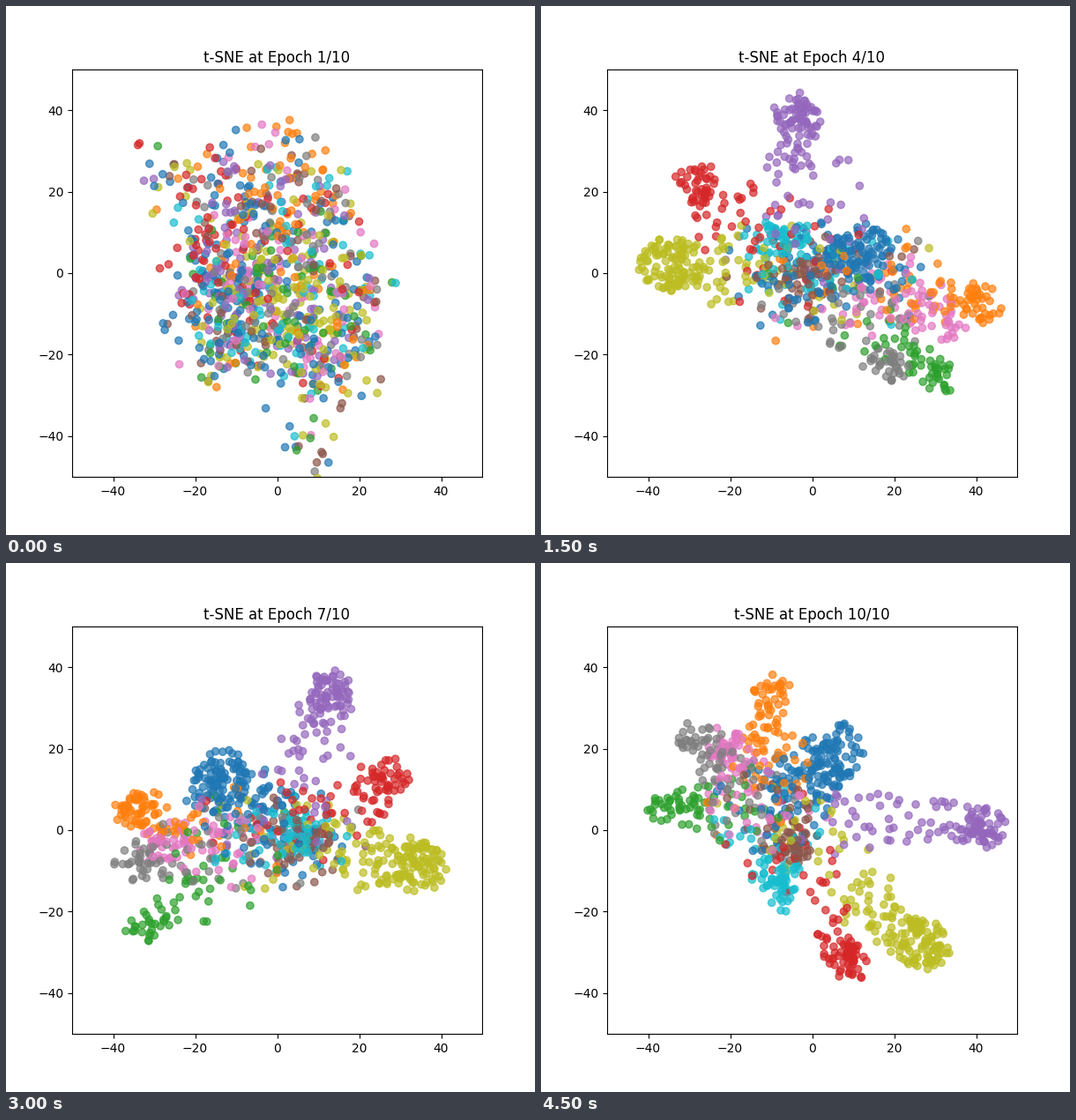
A matplotlib script that plays this animation: 600 by 600 pixels, repeating every 5000 ms.

```python
import numpy as np
import matplotlib.pyplot as plt
from matplotlib.animation import FuncAnimation

STEP_MS = 500
# Classes in tab10 order: size, and how strongly each one separates
SIZES = np.array([175, 90, 65, 90, 120, 70, 80, 75, 165, 80])
TRUST = np.array([0.6, 1, 1, 1.1, 1.4, 0.5, 0.7, 0.7, 1.2, 0.6])

rng = np.random.default_rng(7)
labels = rng.permutation(np.repeat(np.arange(10), SIZES))
core = 0.5 * np.sqrt(SIZES)[labels, None]


def stretch(layout, sx, sy):
    """Mirror and scale a layout about the origin."""
    tips, lobes = layout
    return ([(x * sx, y * sy) for x, y in tips],
            [(x * sx, y * sy, rx, ry) for x, y, rx, ry in lobes])


# A layout is one tip per class plus the mixed lobes (x, y, rx, ry)
mixed = ([(-25, -3), (4, 35), (4, -24), (-32, 27), (-15, -1),
          (0, 0), (0, 32), (20, 8), (5, -12), (2, -4)],
         [(-1, 6, 24, 34), (-14, -13, 15, 16), (15, -24, 12, 11),
          (10, -44, 5, 8), (-30, 25, 5, 11), (26, -3, 5, 16)])
tall = ([(-16, 6), (-11, -36), (-24, -25), (33, 16), (34, -5),
         (-11, 12), (-10, -42), (4, -28), (6, 38), (-26, 3)],
        [(0, 1, 19, 27)])
wide = ([(13, 5), (42, -8), (31, -26), (-29, 24), (-4, 39),
         (-3, 0), (34, -13), (20, -25), (-36, 2), (-10, 9)],
        [(-8, -1, 19, 17), (15, 0, 17, 14)])
slanted = ([(-10, 13), (28, 35), (3, 37), (5, -30), (25, -14),
            (-13, 9), (14, 31), (9, 28), (-22, -36), (-20, 1)],
           [(-10, 2, 14, 18), (6, 12, 12, 18)])
flat = ([(-14, 14), (-36, 5), (-33, -24), (28, 13), (13, 34),
         (8, -2), (-30, -4), (-36, -8), (35, -9), (6, -1)],
        [(-10, 0, 15, 16), (8, -4, 16, 14)])
forked = ([(-20, -4), (-25, -25), (8, -32), (30, 8), (-8, 40),
           (-4, 8), (-16, -30), (-9, -35), (29, 33), (6, 6)],
          [(2, -3, 17, 17)])
star = ([(7, 20), (-10, 34), (-37, 6), (9, -33), (43, 1),
         (-4, -4), (-22, 22), (-30, 24), (28, -29), (-8, -16)],
        [(-11, 4, 16, 13)])

layouts = [mixed, stretch(tall, -0.9, -0.85), tall, wide, slanted,
           stretch(flat, 0.85, -0.9), flat, stretch(forked, 1.2, -1),
           forked, star]


def embed(i):
    """Spread every class from its tip back into the mixed lobes."""
    rng = np.random.default_rng(100 + i)
    n = len(labels)
    tips, lobes = map(np.array, layouts[i])
    area = lobes[:, 2] * lobes[:, 3]
    home = lobes[rng.choice(len(lobes), n, p=area / area.sum())]

    # Points gather at the tips as training goes on
    order = 0.3 + 2.2 * (1 - np.exp(-i / 1.5))
    s = (rng.random(n) ** (order * TRUST[labels]))[:, None]
    r = rng.random(n) ** 0.53
    a = rng.random(n) * 2 * np.pi
    disk = np.column_stack([r * np.cos(a), r * np.sin(a)])

    tip = tips[labels]
    reach = core + (home[:, 2:] - core) * s ** 1.5
    return tip + (home[:, :2] - tip) * s + disk * reach


epochs = [embed(i) for i in range(len(layouts))]

fig, ax = plt.subplots(figsize=(6, 6), dpi=100)
dots = ax.scatter(*epochs[0].T, c=labels, cmap="tab10", alpha=0.7)
ax.set_xlim(-50, 50)
ax.set_ylim(-50, 50)
title = ax.set_title("")


def draw(i):
    dots.set_offsets(epochs[i])
    title.set_text(f"t-SNE at Epoch {i + 1}/{len(epochs)}")
    return dots, title


anim = FuncAnimation(fig, draw, frames=len(epochs), interval=STEP_MS,
                     repeat=True)
plt.show()
```
